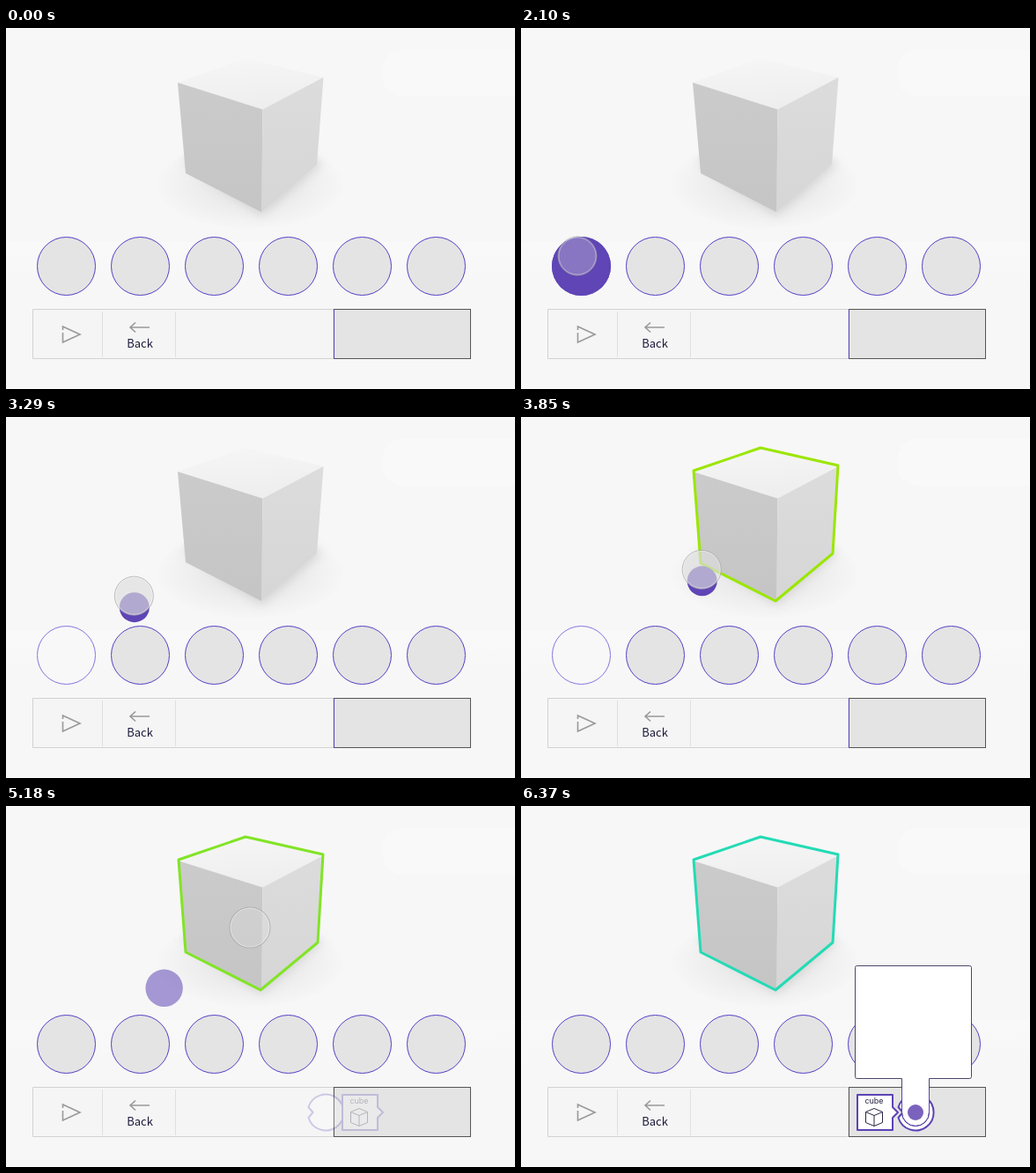
An HTML page that plays this animation: 578x410 px, repeating every 8000 ms.

```html
<!DOCTYPE html>
<html lang="en">
<head>
<meta charset="utf-8">
<title>Drag a colour onto the cube</title>
<style>
html, body { margin: 0; width: 100%; height: 100%; overflow: hidden; background: #f7f7f7; }
svg { display: block; width: 100vw; height: 100vh; }
.slot { fill: #e4e4e4; stroke: #5440c6; }
.icon { fill: none; stroke: #999; stroke-width: 1.6; }
.back { font: 13px "Noto Sans CJK JP", "Noto Sans CJK SC", "Open Sans", sans-serif; fill: #1c1a3a; text-anchor: middle; }
.cube-label { font: 9px Inter, "Liberation Sans", sans-serif; fill: #2b2545; text-anchor: middle; }
.plug { fill: #fff; stroke: #5c43b5; stroke-width: 2; stroke-linejoin: round; }
.popup { fill: #fff; stroke: #4c4668; }
</style>
</head>
<body>
<svg viewBox="0 0 578 410">
  <defs>
    <linearGradient id="topFace" x1="0" y1="0" x2=".2" y2="1"><stop stop-color="#f6f6f6"/><stop offset="1" stop-color="#eeeeee"/></linearGradient>
    <linearGradient id="leftFace" x1="0" y1="0" x2="0" y2="1"><stop stop-color="#cbcbcb"/><stop offset="1" stop-color="#c5c5c5"/></linearGradient>
    <linearGradient id="rightFace" x1="0" y1="0" x2="0" y2="1"><stop stop-color="#dcdcdc"/><stop offset="1" stop-color="#d6d6d6"/></linearGradient>
    <linearGradient id="floor" x1="0" y1="0" x2="0" y2="1"><stop stop-color="#f9f9f9"/><stop offset="1" stop-color="#f7f7f7"/></linearGradient>
    <radialGradient id="halo"><stop stop-color="#e2e2e2"/><stop offset=".75" stop-color="#f1f1f1"/><stop offset="1" stop-color="#f6f6f6"/></radialGradient>
    <filter id="soft" x="-30%" y="-30%" width="160%" height="160%"><feGaussianBlur stdDeviation="6"/></filter>
  </defs>

  <rect width="578" height="410" fill="#f7f7f7"/>
  <rect y="243" width="578" height="54" fill="url(#floor)"/>
  <path d="M0 .5H578M0 409.5H578" stroke="#fdfdfd"/>
  <path d="M578 25H447Q427 30 427 52T450 78H578Z" fill="#f9f9f9"/>

  <ellipse cx="277" cy="178" rx="105" ry="50" fill="url(#halo)"/>
  <path d="M199 152L290 214L360 154L290 120Z" fill="#c4c4c4" opacity=".6" filter="url(#soft)"/>
  <path d="M195 62L272 35L360 56L291.500 93Z" fill="url(#topFace)"/>
  <path d="M195 62L291.500 92.500L290 209L204 165Z" fill="url(#leftFace)"/>
  <path d="M291.500 92.500L360.500 56L353 155L290 209Z" fill="url(#rightFace)"/>
  <path id="outline" d="M196 61L272 35L360 55L354 155L289 209L204 166Z" fill="none" stroke-width="3" stroke-linejoin="round"/>

  <g id="slots"></g>

  <path d="M30.500 319.500H372V375.500H30.500Z" fill="#f5f5f5" stroke="#d2d2d2"/>
  <path d="M109.500 322V374M192.500 322V374" stroke="#dfdfdf"/>
  <path class="icon" d="M64.500 343V339L84 348L64.500 357V346"/>
  <path class="icon" d="M163 340H141M147 334.500L141 340L147 345.500"/>
  <text class="back" x="152" y="363">Back</text>
  <rect x="372.500" y="319.500" width="155" height="56" fill="#e4e4e4" stroke="#555"/>
  <path id="edge" d="M372.500 320V376" stroke="#5440c6"/>

  <g id="block">
    <path id="ring" class="plug" d="M428.500 342A20.500 20.500 0 1 1 428.500 354L433.500 348Z"/>
    <path class="plug" d="M382 328H422V342L428 348L422 354V368H382Z"/>
    <text class="cube-label" x="401" y="338">cube</text>
    <path d="M401 343.500L410.500 347.500V359.500L401 363.500L391.500 359.500V347.500ZM391.500 347.500L401 351.500L410.500 347.500M401 351.500V363.500" fill="none" stroke="#2b2545" stroke-linejoin="round"/>
  </g>
  <g id="popup">
    <path class="popup" d="M381.500 181.500H509.500Q511.500 181.500 511.500 183.500V307.500Q511.500 309.500 509.500 309.500H463.500V348A15.500 15.500 0 0 1 432.500 348V309.500H381.500Q379.500 309.500 379.500 307.500V183.500Q379.500 181.500 381.500 181.500Z"/>
    <path d="M463.500 322V348A15.500 15.500 0 0 1 432.500 348V322" fill="none" stroke="#5c43b5"/>
    <circle cx="448" cy="348" r="9" fill="#7a62bd"/>
  </g>

  <circle id="ball" fill="#5f45b5"/>
  <g id="cursor">
    <circle id="pad" r="22" fill="#dedede"/>
    <circle r="22" fill="none" stroke="#a0a0a0" stroke-opacity=".65"/>
    <circle r="21" fill="none" stroke="#fff" stroke-opacity=".35"/>
  </g>
</svg>
<script>
const LOOP = 8000, STEP = 70;
const HOME = [68.5, 270.5];
const $ = id => document.getElementById(id);
const set = (id, attrs) => { for (const k in attrs) $(id).setAttribute(k, attrs[k]); };
const span = (t, a, b) => Math.min(1, Math.max(0, (t - a) / (b - a)));
const mix = (a, b, k) => a + (b - a) * k;
const mixPoint = (p, q, k) => p.map((v, i) => mix(v, q[i], k));
const mixColor = (a, b, k) => `rgb(${mixPoint(a, b, k).map(Math.round)})`;
const easeOut = (u, power = 3) => 1 - (1 - u) ** power;
const sine = u => (1 - Math.cos(Math.PI * u)) / 2;

for (let i = 0; i < 6; i++) {
  $('slots').innerHTML += `<circle class="slot" cx="${HOME[0] + 84 * i}" cy="${HOME[1]}" r="33"/>`;
}
const firstSlot = $('slots').firstChild;

// start, end, from, to, easing
const moves = [
  [910, 2100, [-18, 185], [64, 259], u => easeOut(u, 1.6)],
  [2590, 3360, [64, 259], [147, 202], sine],
  [3360, 4410, [147, 202], [277, 138], sine],
  [6020, 6370, [277, 138], [304.5, 100.5], u => u]
];

function cursorAt(t) {
  const [start, end, from, to, ease] = moves.filter(m => t >= m[0]).pop() || moves[0];
  return mixPoint(from, to, ease(span(t, start, end)));
}

function ballAt(t, cursor) {
  if (t < 5110) {
    const k = sine(span(t, 2590, 3080));
    const held = [cursor[0] + 0.5, cursor[1] + 13];
    return { at: mixPoint(HOME, held, k), r: mix(33.5, 17, k), alpha: span(t, 1750, 2100) };
  }
  const k = easeOut(span(t, 5110, 5480));
  return { at: mixPoint([277, 151], HOME, k), r: 17 + 9 * k, alpha: 1 - k };
}

function draw(t) {
  const cursor = cursorAt(t);
  const pressed = t >= 2450 && t < 5180;
  const scale = t < 1750 || t >= 5180 ? 23 / 22 : 1;
  set('cursor', {
    transform: `translate(${cursor}) scale(${scale})`,
    opacity: span(t, 910, 1260) * (1 - span(t, 6020, 6370))
  });
  set('pad', { 'fill-opacity': pressed ? 0.66 : 0.32 });

  const ball = ballAt(t, cursor);
  set('ball', { cx: ball.at[0], cy: ball.at[1], r: ball.r, opacity: ball.alpha });

  const empty = t >= 2660 && t < 5180;
  const hover = t < 2660 ? span(t, 1400, 1610) : 0;
  firstSlot.style.fill = empty ? '#f8f8f8' : mixColor([228, 228, 228], [219, 219, 219], hover);
  firstSlot.style.stroke = empty ? '#8575e0' : '';

  set('outline', {
    stroke: mixColor([155, 230, 0], [36, 219, 181], span(t, 5110, 5600) ** 0.8),
    opacity: span(t, 3640, 3850)
  });

  const arrive = easeOut(span(t, 5180, 5600));
  set('edge', { opacity: t < 5180 ? 1 : 0 });
  set('block', { opacity: t < 5180 ? 0 : mix(0.25, 1, span(t, 5180, 5530)) });
  set('ring', { transform: `translate(${mix(-85, 0, arrive)} 0)` });
  const rise = easeOut(span(t, 5180, 5600));
  set('popup', { transform: `translate(0 ${150 * (1 - rise)})`, opacity: span(t, 5180, 5460) });
}

function tick(now) {
  draw(Math.floor((now % LOOP) / STEP) * STEP);
  requestAnimationFrame(tick);
}
draw(0);
requestAnimationFrame(tick);
</script>
</body>
</html>
```
